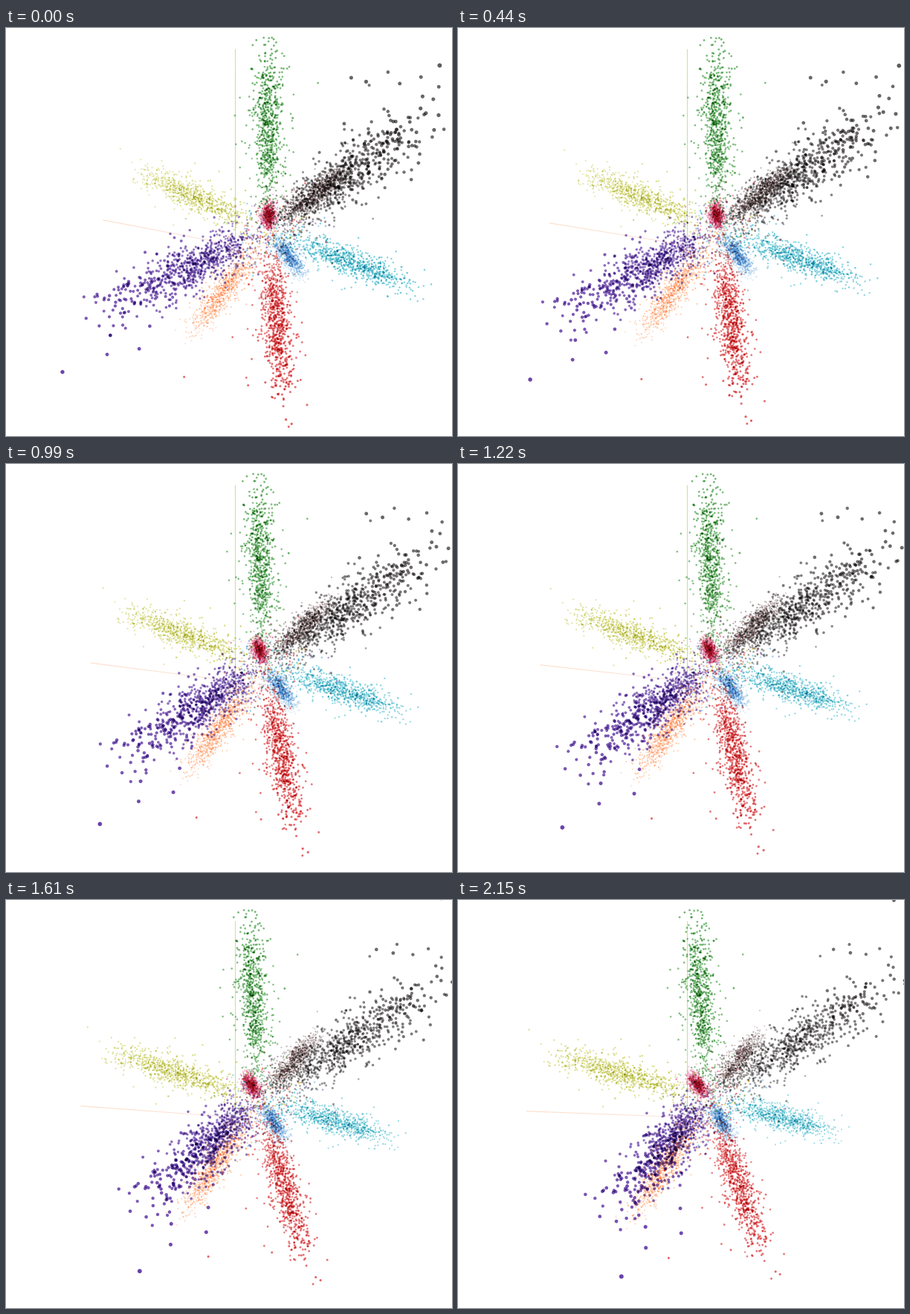
Write a matplotlib script that moves like this. It is 600x550 px and loops after 2180 ms.

```python
import numpy as np
import matplotlib.pyplot as plt
from matplotlib.animation import FuncAnimation
from matplotlib.collections import LineCollection
from matplotlib.colors import to_rgb

W, H, DPI = 600, 550, 100
STEP, FRAMES = 20, 109

# Orbit camera above the origin, looking down at it
FOCAL, DIST = 426, 1.89
TILT = np.radians(28.4)
SIN_E, COS_E = np.sin(TILT), np.cos(TILT)
ORIGIN = np.array([308.4, 293.0])
AXIS_ANGLE = np.radians(22)

# Every arm runs from the hub through its core point (right, up, away)
HUB = np.array([.22, 0, .22])
COUNT = 800
BLACK, PURPLE = "#5f5b5e", "#6940aa"
ARMS = [
    ("#1e8c1e", (.195, .62, .36)),
    ("#d71e23", (.24, -.36, -.26)),
    (BLACK, (.45, .47, -.27)),
    ("#b4b90a", (-.34, .13, .55)),
    (PURPLE, (-.19, .09, -.36)),
    ("#ff8232", (-.11, -.56, .25)),
    ("#00a5be", (.78, -.20, .13)),
    ("#553232", (.60, .15, .54)),
    ("#5aa5dc", (.42, -.33, .40)),
    ("#d72864", (.255, -.037, .58)),
]
STRAYS = [
    (PURPLE, (-.42, .09, -.92)),
    (BLACK, (.54, .92, -.70)),
    (BLACK, (.39, .88, -.60)),
    (BLACK, (.36, .89, -.55)),
]


def build_cloud():
    rng = np.random.default_rng(12)
    points, colors = [], []
    for color, core in ARMS:
        spine = core - HUB
        along = 2 * rng.beta(3.8, 4, (COUNT, 1))
        width = .062 * np.linalg.norm(spine)
        arm = HUB + along * spine + width * rng.standard_t(5, (COUNT, 3))
        loose = rng.random(COUNT) < .03
        arm[loose] = HUB + rng.normal(0, .13, (loose.sum(), 3))
        points.append(arm)
        colors += [to_rgb(color)] * COUNT
    for color, spot in STRAYS:
        points.append([spot])
        colors.append(to_rgb(color))
    return np.vstack(points), np.array(colors)


def turn(points, angle):
    right, up, away = points.T
    c, s = np.cos(angle), np.sin(angle)
    return np.column_stack([c * right - s * away, up, s * right + c * away])


def project(points):
    right, up, away = points.T
    depth = DIST + COS_E * away - SIN_E * up
    x = ORIGIN[0] + FOCAL * right / depth
    y = ORIGIN[1] - FOCAL * (COS_E * up + SIN_E * away) / depth
    return x, y, depth


def angle_at(ms):
    """Steady turn with one quicker stretch."""
    return np.radians(np.interp(ms, [0, 1400, 1610, 2150], [0, 10, 13.35, 17.45]))


CLOUD, COLORS = build_cloud()
REACH = np.arange(-4, 5)
DX, DY = (g.ravel() for g in np.meshgrid(REACH, REACH))


def render(angle):
    """Round dots with distance fog, multiplied together, as an RGBA layer."""
    x, y, depth = project(turn(CLOUD, angle))
    fog = np.clip((depth - .85) * .42, 0, .85)[:, None]
    ink = (1 - COLORS) * (1 - fog)
    radius = 2.45 / depth

    px = np.floor(x).astype(int)[:, None] + DX
    py = np.floor(y).astype(int)[:, None] + DY
    gap = np.hypot(px + .5 - x[:, None], py + .5 - y[:, None])
    cover = np.clip(radius[:, None] + .5 - gap, 0, 1)
    seen = (cover > 0) & (px >= 0) & (px < W) & (py >= 0) & (py < H)
    who = np.nonzero(seen)[0]
    cell = (py * W + px)[seen]
    dye = np.log(1 - cover[seen][:, None] * ink[who])
    rgb = np.exp(np.column_stack(
        [np.bincount(cell, dye[:, k], W * H) for k in range(3)]))

    alpha = 1 - rgb.min(axis=1, keepdims=True)
    tint = (rgb - 1 + alpha) / np.maximum(alpha, 1e-6)
    return np.clip(np.hstack([tint, alpha]), 0, 1).reshape(H, W, 4)


def axis_segments(end, angle):
    line = np.linspace(0, 1, 25)[:, None] * np.array(end)
    x, y, _ = project(turn(line, angle))
    path = np.column_stack([x, y])
    return np.stack([path[:-1], path[1:]], axis=1)


def axis_line(end, near, far):
    colors = np.linspace(to_rgb(near), to_rgb(far), 24)
    line = LineCollection(axis_segments(end, 0), linewidths=.72,
                          colors=colors, zorder=1)
    ax.add_collection(line, autolim=False)
    return line


fig = plt.figure(figsize=(W / DPI, H / DPI), dpi=DPI, facecolor="white")
ax = fig.add_axes([0, 0, 1, 1])
ax.set_xlim(0, W)
ax.set_ylim(H, 0)
ax.axis("off")

X_END = (-np.cos(AXIS_ANGLE), 0, np.sin(AXIS_ANGLE))
x_axis = axis_line(X_END, "#fee6de", "#fddac3")
axis_line((0, 1, 0), "#a0e8a0", "#dedc78")
dots = ax.imshow(np.zeros((H, W, 4)), extent=(0, W, H, 0), aspect="auto",
                 interpolation="nearest", zorder=2)
ax.plot([0, W], [H - .5, H - .5], color="#e0e0e0", lw=.72, zorder=3)


def update(i):
    angle = angle_at(i * STEP)
    x_axis.set_segments(axis_segments(X_END, angle))
    dots.set_data(render(angle))
    return x_axis, dots


anim = FuncAnimation(fig, update, frames=FRAMES, interval=STEP,
                     repeat=True, repeat_delay=0, blit=False)
plt.show()
```
